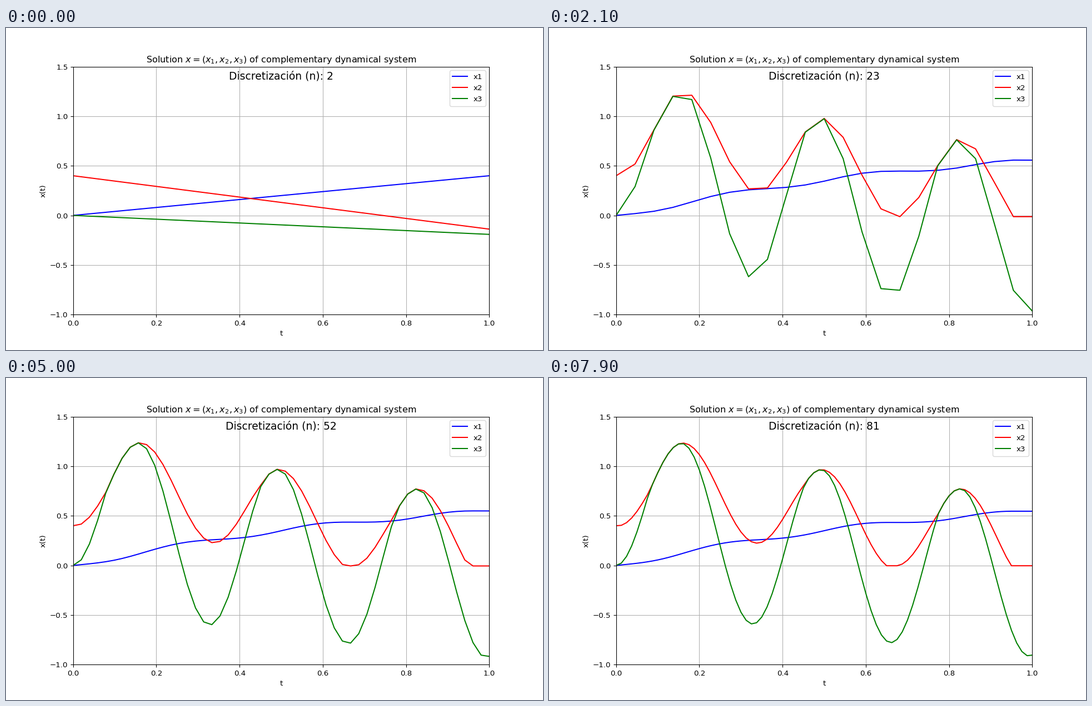
A matplotlib script for the animation above (8000 ms loop, 966x580 px).

```python
import numpy as np
import matplotlib.pyplot as plt
from matplotlib.animation import FuncAnimation

DPI = 96.6
FIRST_N, FRAMES, INTERVAL = 2, 80, 100

# Circuit with two diodes: x1 charge, x2 and x3 currents
AMP, OMEGA = 15.97, 6 * np.pi
COUPLING = 0.73
DAMP2, DAMP3, STIFF = 0.48, 2.15, 0.63
BIAS2, BIAS3 = -0.277, -0.33


def solve(n):
    """Time stepping on n nodes with x2 >= x3 and x2 >= 0."""
    t = np.linspace(0, 1, n)
    h = t[1] - t[0]
    drive = -AMP / OMEGA * np.diff(np.cos(OMEGA * t))
    x = np.zeros((n, 3))
    x[0] = 0, 0.4, 0
    for k, push in enumerate(drive):
        x1, x2, x3 = x[k]
        flow = COUPLING * (x2 - x3)
        y2 = x2 + push / 2 - h * (flow / 2 + DAMP2 * x2 + STIFF * x1)
        y3 = x3 + push + h * (flow - DAMP3 * x3)
        # Complementarity projection
        y2 = max(y2, (2 * y2 + y3) / 3, 0)
        y3 = min(y3, y2)
        x[k + 1] = x1 + h * x2, y2 + h * BIAS2, y3 + h * BIAS3
    return t, x


plt.rcParams["font.family"] = "DejaVu Sans"
fig, ax = plt.subplots(figsize=(966 / DPI, 580 / DPI), dpi=DPI)
lines = [ax.plot([], [], color=c, label=name)[0]
         for c, name in zip(("blue", "red", "green"), ("x1", "x2", "x3"))]
ax.set(xlim=(0, 1), ylim=(-1, 1.5), xlabel="t", ylabel="x(t)")
ax.set_title("Solution $x=(x_1,x_2,x_3)$ of complementary dynamical system")
ax.grid(True)
ax.legend(loc="upper right", labelspacing=0.54)
counter = ax.text(0.5, 0.948, "", transform=ax.transAxes, ha="center", fontsize=14)


def update(frame):
    n = FIRST_N + frame
    t, x = solve(n)
    for line, values in zip(lines, x.T):
        line.set_data(t, values)
    counter.set_text(f"Discretización (n): {n}")
    return [*lines, counter]


anim = FuncAnimation(fig, update, frames=FRAMES, init_func=lambda: update(0),
                     interval=INTERVAL, repeat=True, repeat_delay=0, blit=False)
plt.show()
```
